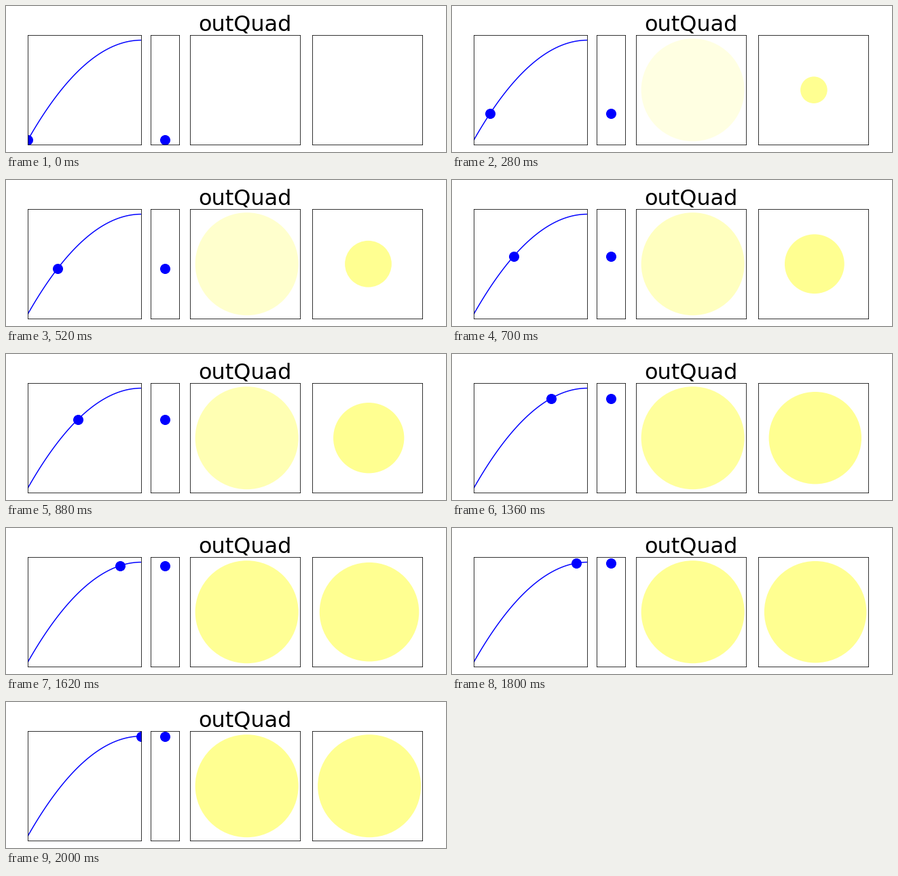
Write a matplotlib script that moves like this. It is 648x216 px and loops after 2020 ms.

```python
import numpy as np
import matplotlib.pyplot as plt
from matplotlib.animation import FuncAnimation
from matplotlib.patches import Circle

STEPS = 100
HALF = 81              # half the side of a square panel, in pixels
OFFSET, RADIUS = 3, 76
SUN = "#ffff91"


def out_quad(t):
    return t * (2 - t)


def add_disc(ax):
    ax.set(xlim=(-HALF, HALF), ylim=(-HALF, HALF), aspect="equal")
    return ax.add_patch(Circle((OFFSET, 0), RADIUS, fc=SUN, lw=0))


plt.rcParams["font.family"] = "DejaVu Sans"
fig, axes = plt.subplots(
    1, 4, figsize=(9, 3), dpi=72, facecolor="white",
    gridspec_kw=dict(width_ratios=[4, 1, 4, 4], left=0.05, right=0.95,
                     bottom=0.05, top=0.8, wspace=0.1))
for ax in axes:
    ax.set(xticks=[], yticks=[])
curve_ax, slide_ax, fade_ax, grow_ax = axes

for ax in (curve_ax, slide_ax):
    ax.set(xlim=(0, 1), ylim=(-0.05, 1.05))
ts = np.linspace(0, 1, STEPS + 1)
curve_ax.plot(ts, out_quad(ts), "b", lw=1.5)
tracer, = curve_ax.plot([0], [0], "bo", ms=14)
slider, = slide_ax.plot([0.5], [0], "bo", ms=14)

fade_ax.set_title("outQuad", fontsize=32)
fading = add_disc(fade_ax)
growing = add_disc(grow_ax)


def update(i):
    t = i / STEPS
    v = out_quad(t)
    tracer.set_data([t], [v])
    slider.set_data([0.5], [v])
    fading.set_alpha(v)
    growing.set_radius(RADIUS * v)
    growing.set_center((OFFSET * v, 0))
    return tracer, slider, fading, growing


anim = FuncAnimation(fig, update, frames=STEPS + 1, interval=20, repeat=True)
plt.show()
```
